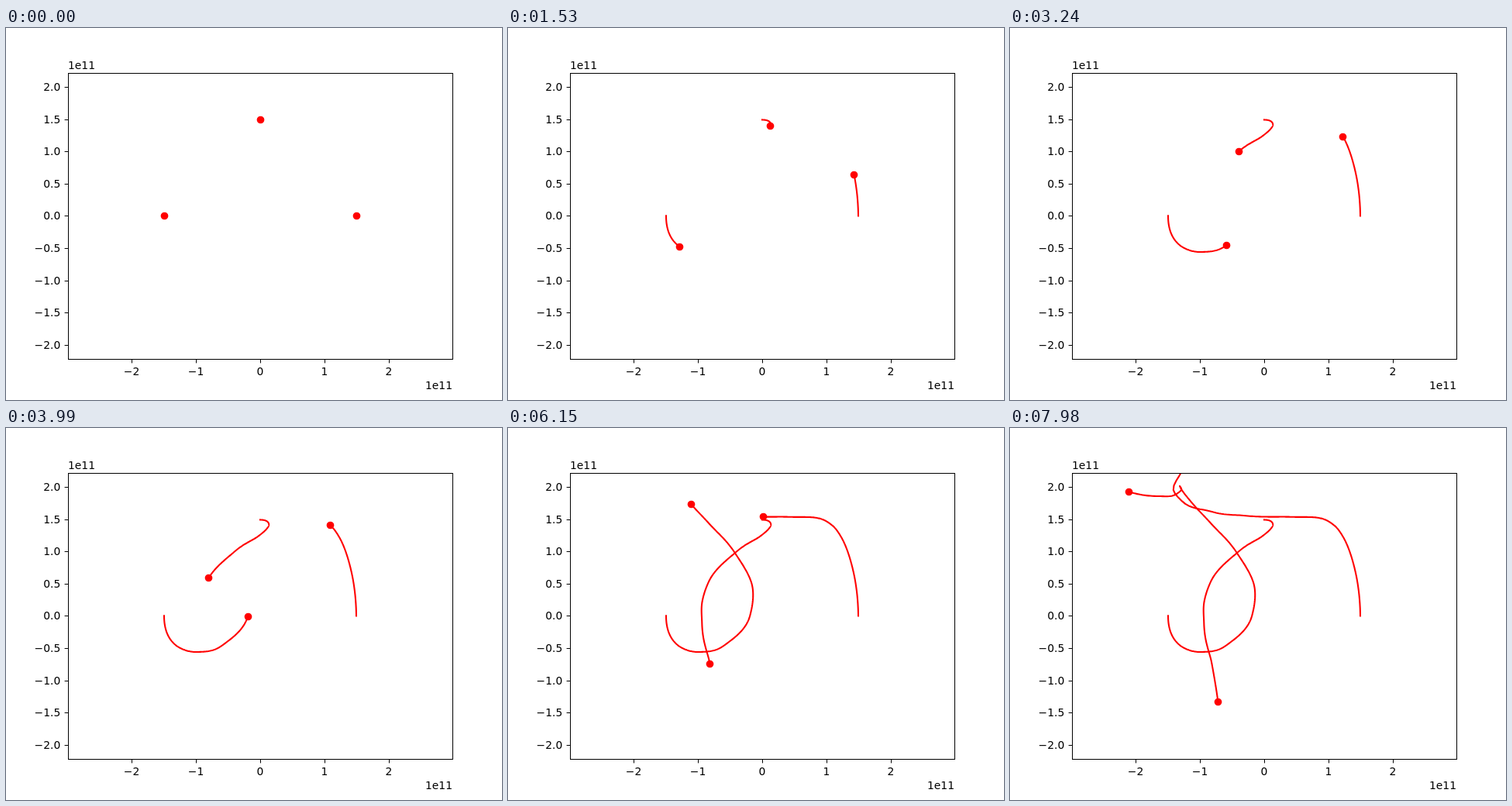
Write an HTML page with a canvas that moves like this. It is 640 px wide and 480 px high and loops after 8 s.

```html
<!DOCTYPE html>
<html lang="en">
<head>
<meta charset="utf-8">
<title>Three orbiting bodies</title>
<style>
  html, body { margin: 0; width: 100%; height: 100%; overflow: hidden; background: #fff; }
  canvas { display: block; }
</style>
</head>
<body>
<canvas id="stage" width="640" height="480"></canvas>
<script>
const ctx = document.getElementById('stage').getContext('2d');
const LOOP = 8000, STEP = 30, LAST = 266;
const LEFT = 80, RIGHT = 576, TOP = 58, BOTTOM = 427;
const ORIGIN = { x: 328, y: 242.4 }, UNIT = 83.22;

// Knots of each orbit: [step, x, y]
const leftBody = [
  [0, 204, 242.4], [27, 209, 267.5], [54, 224, 283.5], [81, 248, 289],
  [108, 279, 280.5], [133, 312, 243], [148, 315, 203], [164, 292, 160],
  [184, 261, 125], [205, 236, 98], [224, 221, 79], [232, 219, 75],
  [238, 220.7, 80.5], [243, 211, 87], [250, 191.5, 88], [266, 153, 82]];

const rightBody = [
  [0, 452, 242.4], [54, 446, 187], [108, 429.5, 140], [135, 417.5, 125],
  [162, 398.5, 116], [189, 361.5, 114.7], [216, 301.5, 113], [230, 258.5, 107.5],
  [238, 222, 94.4], [241, 210.8, 80], [245, 222, 55.5], [266, 290, -30]];

const topBody = [
  [0, 328, 118.4], [27, 337.5, 121], [54, 338, 128], [81, 325, 140],
  [108, 295.5, 159], [135, 259.4, 197.5], [148, 250.6, 224], [162, 250.3, 251.5],
  [205, 260.4, 304], [266, 268.4, 353.4]];

// Smooth curve through the knots, evaluated at every step
function sampleAxis(knots, axis) {
  const n = knots.length - 1;
  const span = i => knots[i + 1][0] - knots[i][0];
  const slope = i => (knots[i + 1][axis] - knots[i][axis]) / span(i);
  const tangent = [];
  for (let i = 1; i < n; i++) {
    const before = span(i - 1), after = span(i);
    tangent[i] = (slope(i - 1) * after + slope(i) * before) / (before + after);
  }
  tangent[0] = 2 * slope(0) - tangent[1];
  tangent[n] = 2 * slope(n - 1) - tangent[n - 1];

  const values = [];
  for (let step = 0, i = 0; step <= LAST; step++) {
    while (i < n - 1 && step > knots[i + 1][0]) i++;
    const h = span(i), u = (step - knots[i][0]) / h, v = 1 - u;
    values.push(
      knots[i][axis] * (1 + 2 * u) * v * v + tangent[i] * h * u * v * v +
      knots[i + 1][axis] * u * u * (3 - 2 * u) - tangent[i + 1] * h * u * u * v);
  }
  return values;
}

const paths = [leftBody, rightBody, topBody].map(knots => {
  const xs = sampleAxis(knots, 1), ys = sampleAxis(knots, 2);
  return xs.map((x, i) => [x, ys[i]]);
});

function drawBody(path, step) {
  ctx.beginPath();
  for (let i = 0; i <= step; i++) ctx.lineTo(...path[i]);
  ctx.stroke();
  const [x, y] = path[step];
  ctx.beginPath();
  ctx.arc(Math.floor(x) + 0.5, Math.floor(y) + 0.5, 4.86, 0, 2 * Math.PI);
  ctx.fill();
}

function label(text, x, y, align) {
  ctx.textAlign = align;
  ctx.fillText(text.replace('-', '\u2212'), x, y);
}

function drawAxes() {
  ctx.fillStyle = ctx.strokeStyle = '#000';
  ctx.lineWidth = 1;
  ctx.font = '13.89px "DejaVu Sans", sans-serif';
  ctx.strokeRect(LEFT + 0.5, TOP + 0.5, RIGHT - LEFT, BOTTOM - TOP);
  for (let v = -2; v <= 2; v++) {
    const x = Math.round(ORIGIN.x + v * UNIT);
    ctx.fillRect(x, BOTTOM, 1, 5.4);
    label(String(v), x, 448, 'center');
  }
  for (let v = -2; v <= 2; v += 0.5) {
    const y = Math.round(ORIGIN.y - v * UNIT);
    ctx.fillRect(LEFT - 4.4, y, 5, 1);
    label(v.toFixed(1), 70.3, y + 5, 'right');
  }
  label('1e11', LEFT, 53, 'left');
  label('1e11', RIGHT, 466, 'right');
}

function draw(now) {
  const step = Math.min(LAST, Math.floor(now % LOOP / STEP));
  ctx.fillStyle = '#fff';
  ctx.fillRect(0, 0, 640, 480);
  ctx.save();
  ctx.beginPath();
  ctx.rect(LEFT, TOP, RIGHT - LEFT, BOTTOM - TOP);
  ctx.clip();
  ctx.fillStyle = ctx.strokeStyle = '#f00';
  ctx.lineWidth = 2.08;
  ctx.lineJoin = 'round';
  ctx.lineCap = 'square';
  paths.forEach(path => drawBody(path, step));
  ctx.restore();
  drawAxes();
}

const start = performance.now();
function tick() {
  draw(performance.now() - start);
  requestAnimationFrame(tick);
}
tick();
</script>
</body>
</html>
```
